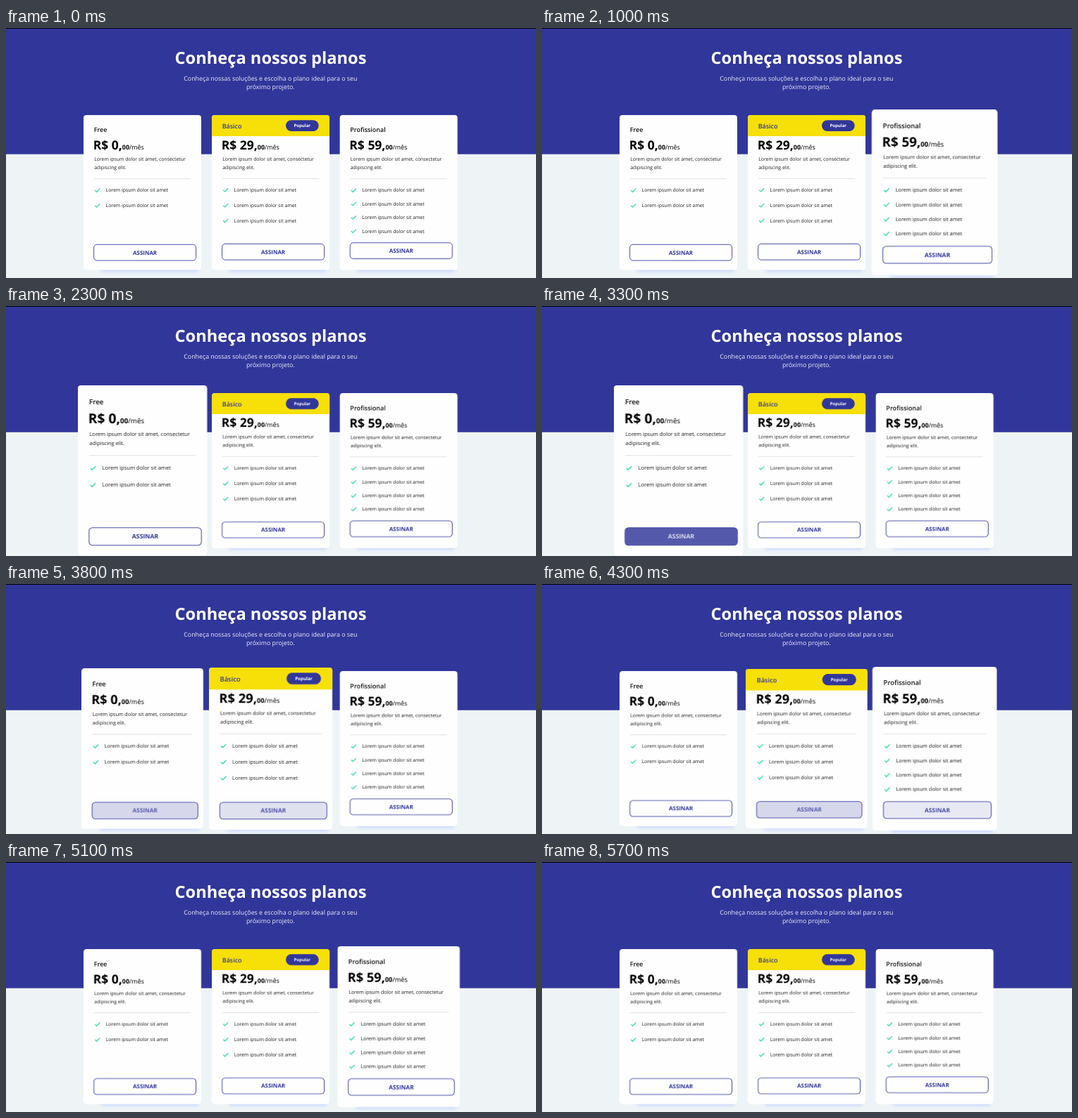
An HTML page that plays this animation: 752x356 px, repeating every 5.8 s.

```html
<!DOCTYPE html>
<html lang="pt-BR">
<head>
<meta charset="utf-8">
<title>Planos</title>
<style>
html, body { margin: 0; width: 100%; height: 100%; overflow: hidden; background: #eef4f5; }
svg { display: block; width: 752px; height: 356px; }
text { font-family: "Open Sans", "Noto Sans", sans-serif; font-size: 6.87px; fill: #1c1c1c; text-rendering: geometricPrecision; }
.title { font-size: 23.65px; font-weight: 700; fill: #fff; text-anchor: middle; }
.sub { font-size: 8.84px; fill: #eceefa; text-anchor: middle; }
.name { font-size: 8.95px; font-weight: 600; fill: #111; }
.price { font-size: 17.5px; font-weight: 700; fill: #000; }
.cents { font-size: 8.9px; }
.month { font-size: 8.9px; font-weight: 400; }
.tag { font-size: 6.05px; font-weight: 700; fill: #fff; text-anchor: middle; }
.cta { font-size: 7.95px; font-weight: 700; fill: #31369a; text-anchor: middle; }
.btn { fill: #fefefe; stroke: #4a4fa6; stroke-width: 1; }
.shadow { fill: #cddafc; filter: blur(2.5px); }
.tick { fill: none; stroke: #48dfae; stroke-width: 1.5; }
</style>
</head>
<body>
<svg id="stage" viewBox="0 0 752 356">
  <rect width="752" height="356" fill="#eef4f5"/>
  <rect width="752" height="179.7" fill="#31369a"/>
  <rect width="752" height="1" fill="#000"/>
  <text class="title" x="375.5" y="50.8">Conheça nossos planos</text>
  <text class="sub" x="375.3" y="74.9">Conheça nossas soluções e escolha o plano ideal para o seu</text>
  <text class="sub" x="375.3" y="87.1">próximo projeto.</text>
</svg>
<script>
const LOOP = 5800, FADE = 200, BLUE = '#31369a', WHITE = '#fefefe';
const stage = document.getElementById('stage');

// hover and press: [enter, leave] times in ms
const plans = [
  { name: 'Free', price: '0', x: 110, nameY: 148.3, y: 0, items: [233.4, 255.3], btnY: 308.3,
    hover: [[2110, 3725]], press: [[3196, 3700]] },
  { name: 'Básico', price: '29', x: 292, nameY: 143.2, y: -.4, items: [233, 255, 276.7], btnY: 307.4, popular: true,
    hover: [[1420, 2060], [3745, 4220]], press: [[3775, 4200]] },
  { name: 'Profissional', price: '59', x: 473.6, nameY: 148.3, y: .1, items: [233.4, 252.8, 272.2, 291.5], btnY: 305.8,
    hover: [[920, 1370], [4236, 5030]], press: [[4280, 4850]] }
];

const line = (cls, x, y, s) => `<text class="${cls}" x="${x}" y="${y}">${s}</text>`;

function cardMarkup(p) {
  const { x, y } = p, left = x + 15.2;
  const item = b => `<path class="tick" d="M${x + 16.3} ${b - 2.3}l2.3 2.3l4.6 -4.7"/>` +
    line('', x + 31.6, b, 'Lorem ipsum dolor sit amet');
  const badge = `<path d="M${x} 154v-26a4 4 0 0 1 4-4h159a4 4 0 0 1 4 4v26z" fill="#f6e008"/>
    <rect x="${x + 105}" y="131.2" width="46.7" height="15.8" rx="7.9" fill="${BLUE}"/>` +
    line('tag', x + 128.3, 141.3, 'Popular');
  return `<rect class="shadow" x="${x + 24}" y="324" width="139" height="23.5" rx="4"/>
    <rect x="${x}" y="124" width="167" height="220.6" rx="4" fill="${WHITE}"/>
    ${p.popular ? badge : ''}
    <text class="name" x="${x + 14.7}" y="${p.nameY}"${p.popular ? ` style="fill:${BLUE}"` : ''}>${p.name}</text>
    <text class="price" x="${x + 13.7}" y="${173 + y}">R$ ${p.price},<tspan class="cents">00</tspan><tspan class="month">/mês</tspan></text>
    ${line('', left, 189 + y, 'Lorem ipsum dolor sit amet, consectetur')}
    ${line('', left, 201 + y, 'adipiscing elit.')}
    <rect x="${x + 15}" y="${214.3 + y}" width="137" height=".8" fill="#dedede"/>
    ${p.items.map(item).join('')}
    <rect class="btn" x="${x + 14.6}" y="${p.btnY}" width="145" height="22.8" rx="4.5"/>
    ${line('cta', x + 87.1, p.btnY + 14.3, 'ASSINAR')}`;
}

// eased change to "on" at each enter time and back to "off" at each leave time
function toggle(el, prop, off, on, spans) {
  const frames = [{ offset: 0, [prop]: off }];
  const step = (t, from, to) => frames.push(
    { offset: t / LOOP, [prop]: from, easing: 'ease' },
    { offset: (t + FADE) / LOOP, [prop]: to });
  for (const [enter, leave] of spans) {
    step(enter, off, on);
    step(leave, on, off);
  }
  frames.push({ offset: 1, [prop]: off });
  el.animate(frames, { duration: LOOP, iterations: Infinity });
}

for (const p of plans) {
  const card = document.createElementNS(stage.namespaceURI, 'g');
  card.innerHTML = cardMarkup(p);
  card.style.transformOrigin = `${p.x + 83.5}px 234.3px`;
  stage.append(card);
  toggle(card, 'transform', 'scale(1)', 'scale(1.1)', p.hover);
  toggle(card.querySelector('.btn'), 'fill', WHITE, BLUE, p.press);
  toggle(card.querySelector('.cta'), 'fill', BLUE, WHITE, p.press);
}
</script>
</body>
</html>
```
